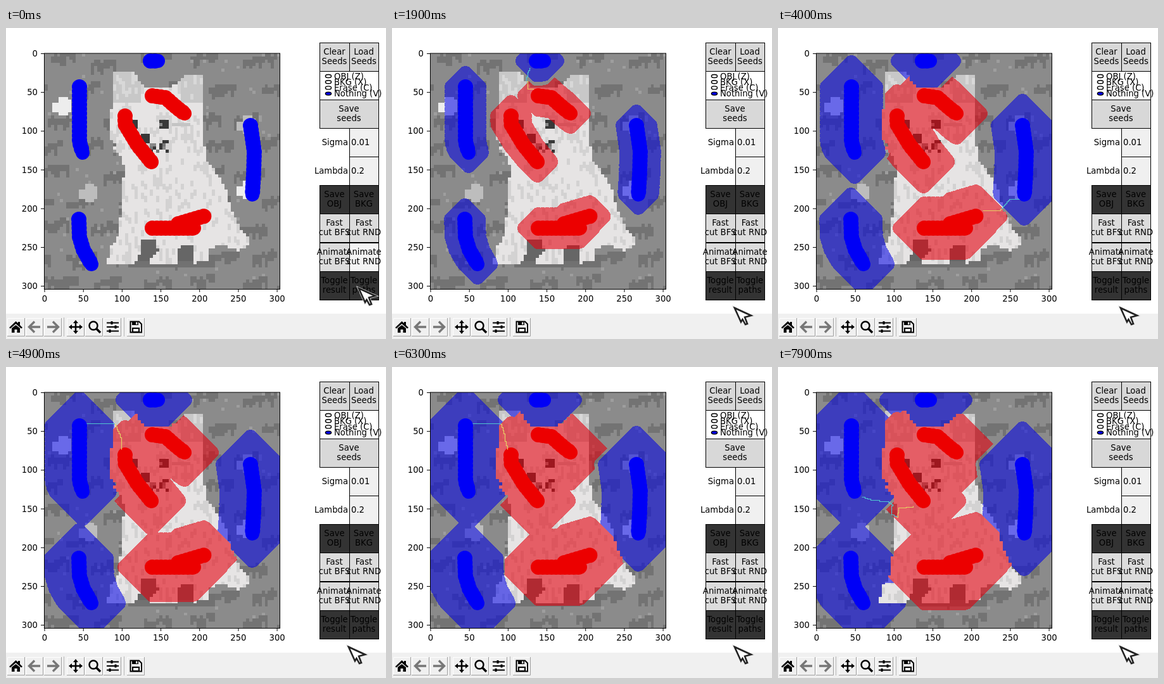
These frames come from a looping animation (600 px wide and 491 px high, 8000 ms). An HTML page with a canvas:

```html
<!DOCTYPE html>
<html lang="en">
<head>
<meta charset="utf-8">
<title>Graph cut segmentation</title>
<style>
  html, body { margin: 0; width: 100%; height: 100%; overflow: hidden; background: #fff; }
  canvas { position: absolute; left: 61px; top: 40px; }
  svg { position: absolute; left: 0; top: 0; }
  text { font: 13.2px "DejaVu Sans", sans-serif; dominant-baseline: central; }
  .mid { text-anchor: middle; }
  .end { text-anchor: end; }
</style>
</head>
<body>
<canvas id="plot" width="372" height="372"></canvas>
<svg id="ui" width="600" height="491" viewBox="0 0 600 491"></svg>
<script>
const LOOP = 8000, STEP = 100, SIZE = 372, GRID = 76, CELL = SIZE / GRID;
const LEFT = 61, TOP = 40;
const ctx = document.getElementById('plot').getContext('2d');
const ui = document.getElementById('ui');

function seeded(n) {
  return () => {
    n = (n + 0x6D2B79F5) | 0;
    let v = Math.imul(n ^ (n >>> 15), n | 1);
    v ^= v + Math.imul(v ^ (v >>> 7), v | 61);
    return ((v ^ (v >>> 14)) >>> 0) / 4294967296;
  };
}

function layer() {
  const c = document.createElement('canvas');
  c.width = c.height = SIZE;
  return c.getContext('2d', { willReadFrequently: true });
}

// ---- pixel picture ----
const dog = new Path2D(`M170 67H198L206 77 212 88 220 93H262L272 85 284 72H312L311 175
  317 208 335 232 347 255 354 283 366 308 376 324 387 334 383 344 366 352 345 344 322 347 322 369
  294 371 294 343 270 347 274 372 232 374 226 364 240 352 238 334 214 336 212 356 203 372
  160 375 163 350 176 330 182 290 184 250 188 218 182 205 172 190 164 166 164 140 171 118Z`);
const base = layer(), inDog = new Uint8Array(GRID * GRID);

function cells(fill, x, y, w = 1, h = 1) {
  base.fillStyle = fill;
  const x0 = Math.round(x * CELL), y0 = Math.round(y * CELL);
  base.fillRect(x0, y0, Math.round((x + w) * CELL) - x0, Math.round((y + h) * CELL) - y0);
}

function paintBackground(rnd) {
  const int = n => Math.floor(rnd() * n);
  cells('#8b8b8b', 0, 0, GRID, GRID);
  // ragged tufts, built column by column
  for (let row = 0; row < 9; row++)
    for (let col = -1; col < 6; col++) {
      const x = col * 15 + (row % 2) * 7 + int(5), y = row * 9 + int(3), w = 8 + int(4);
      for (let k = 0; k < w; k++)
        cells('#737373', x + k, y + int(2) + (k > w / 2 ? -1 : 0), 1, 2 + int(3));
    }
  for (let k = 0; k < 75; k++) cells('#9e9e9e', int(GRID), int(GRID));
  const blob = (fill, x, y) => {
    cells(fill, x, y, 3, 6);
    cells(fill, x - 2, y + 2, 6, 3);
    cells(fill, x + 2, y + 1, 2, 2);
  };
  blob('#ededed', 4.5, 14);
  blob('#bdbdbd', 13, 42);
  blob('#bdbdbd', 64, 20);
  blob('#ededed', 64, 41);
  cells('#717171', 27, 65, 28, 4);
  cells('#666', 30, 60, 7, 7);
  cells('#666', 42, 62, 6, 5);
}

function paintDog(rnd) {
  const specks = Array.from({ length: GRID * GRID }, rnd);
  for (let y = 0; y < GRID; y++)
    for (let x = 0; x < GRID; x++) {
      const px = LEFT + (x + .5) * CELL, py = TOP + (y + .5) * CELL;
      const shift = px < 195 && py > 130 && py < 215 ? ((y >> 1) % 2 ? 2 : -2) : 0;
      if (!base.isPointInPath(dog, px + shift, py)) continue;
      inDog[y * GRID + x] = 1;
      const ear = py < 118 && (px < 212 || px > 274);
      const speck = specks[((y + x % 2) >> 1) * GRID + x] < .24;
      cells(ear ? (speck ? '#d8d8d8' : '#c8c8c8') : speck ? '#d3d2d2' : '#e6e4e4', x, y);
    }
}

function paintFace() {
  const dark = '#383838';
  cells(dark, 28, 21.4, 2, 3);
  cells(dark, 37, 21.4, 3, 3);
  cells('#8a8a8a', 37, 22.4);
  cells('#c4c4c4', 41, 22.4, 6);
  cells(dark, 31, 26, 3, 3);
  for (let k = 0; k < 7; k++) {
    cells(k % 2 ? '#777' : dark, 33 + k, 31 - (k % 3));
    cells(k % 2 ? dark : '#888', 34 + k % 5, 29 + k % 3);
  }
  cells(dark, 38, 28, 2);
}

// ---- seeds and their city-block distances ----
const seeds = {
  blue: 'M116 93V180L121 197M115 302L116 330 122 350 135 373M228 52H240M386 154L392 195 391 230 389 263',
  red: 'M231 107L252 110 270 126 282 135M188 139V152L208 185 230 212M231 316H297M272 309L292 303 313 297'
};

function paintSeeds(kind, colour) {
  const c = layer(), path = new Path2D(seeds[kind]);
  c.translate(-LEFT, -TOP);
  c.lineCap = c.lineJoin = 'round';
  c.strokeStyle = colour;
  c.lineWidth = 22;
  c.stroke(path);
  // overlapping brush dabs give the scalloped rim
  c.lineWidth = 24;
  c.setLineDash([0, 7]);
  c.stroke(path);
  return c;
}

function distances(c) {
  const rgba = c.getImageData(0, 0, SIZE, SIZE).data;
  const d = new Int16Array(SIZE * SIZE);
  for (let i = 0; i < d.length; i++) d[i] = rgba[i * 4 + 3] > 127 ? 0 : 9999;
  for (let y = 0; y < SIZE; y++)
    for (let x = 0; x < SIZE; x++) {
      const i = y * SIZE + x;
      if (x) d[i] = Math.min(d[i], d[i - 1] + 1);
      if (y) d[i] = Math.min(d[i], d[i - SIZE] + 1);
    }
  for (let y = SIZE - 1; y >= 0; y--)
    for (let x = SIZE - 1; x >= 0; x--) {
      const i = y * SIZE + x;
      if (x < SIZE - 1) d[i] = Math.min(d[i], d[i + 1] + 1);
      if (y < SIZE - 1) d[i] = Math.min(d[i], d[i + SIZE] + 1);
    }
  return d;
}

const rndPicture = seeded(17);
paintBackground(rndPicture);
paintDog(rndPicture);
paintFace();
const blueSeeds = paintSeeds('blue', '#0000f6'), redSeeds = paintSeeds('red', '#ec0000');
const toBlue = distances(blueSeeds), toRed = distances(redSeeds);

// ---- growing regions ----
const growth = [[0, 0], [1200, 15.5], [2800, 28.5], [4000, 38.5], [5600, 46.5], [7100, 52], [8000, 57.5]];

function reachAt(t) {
  const k = growth.findIndex(g => g[0] > t);
  const [t0, a] = growth[k - 1], [t1, b] = growth[k];
  return a + (b - a) * (t - t0) / (t1 - t0);
}

const tint = layer(), tintData = tint.createImageData(SIZE, SIZE);
const RED = [228, 0, 14, 150], BLUE = [0, 0, 230, 142], NONE = [0, 0, 0, 0];

function labelAt(x, y, reach, t) {
  const i = y * SIZE + x;
  const dog = inDog[Math.floor((y + .5) / CELL) * GRID + Math.floor((x + .5) / CELL)];
  const red = toRed[i] <= reach, blue = toBlue[i] <= reach;
  if (dog) {
    if (red) return RED;
    const freed = y > 300 && x < 145 && t >= (x < 117 ? 7000 : 7200);
    return blue && !freed ? BLUE : NONE;
  }
  if (blue) return BLUE;
  return red && toBlue[i] > reach + 6 ? RED : NONE;
}

function paintRegions(t) {
  const reach = reachAt(t);
  for (let y = 0; y < SIZE; y++)
    for (let x = 0; x < SIZE; x++)
      tintData.data.set(labelAt(x, y, reach, t), (y * SIZE + x) * 4);
  tint.putImageData(tintData, 0, 0);
  ctx.drawImage(tint.canvas, 0, 0);
}

// ---- augmenting paths: from time, settled time, blue half, red half ----
const routes = [
  [300, 1200, [233, 63, 233, 80], [233, 80, 233, 95]],
  [1900, 2800, [218, 63, 212, 70, 212, 84], [212, 84, 215, 94, 223, 97]],
  [3400, 4000, [381, 270, 365, 272, 353, 286], [353, 286, 351, 288, 323, 288]],
  [4800, 5600, [127, 89, 171, 90], [171, 90, 174, 108, 180, 118, 182, 130]],
  [6400, 7100, [147, 378, 177, 378, 178, 335], [178, 335, 186, 331, 212, 330, 223, 325]],
  [7500, 7900, [132, 205, 146, 210, 174, 213, 181, 219, 179, 233, 187, 237], [187, 237, 190, 222, 213, 219]]
];

function stairs(points, wobble, rnd) {
  let [x, y] = points, d = `M${x} ${y}`;
  for (let k = 2; k < points.length; k += 2) {
    const last = k === points.length - 2;
    const tx = points[k] + (last ? 0 : Math.round((rnd() - .5) * wobble));
    const ty = points[k + 1] + (last ? 0 : Math.round((rnd() - .5) * wobble));
    const n = Math.max(1, Math.round(Math.min(Math.abs(tx - x), Math.abs(ty - y)) / 2));
    for (let s = 1; s <= n; s++)
      d += `H${Math.round(x + (tx - x) * s / n)}V${Math.round(y + (ty - y) * s / n)}`;
    x = tx;
    y = ty;
  }
  return new Path2D(d);
}

function paintPath(t) {
  const route = routes.filter(r => r[0] <= t).pop();
  if (!route) return;
  const [, settled, blueHalf, redHalf] = route;
  const rnd = seeded(t), wobble = t === settled ? 0 : 9;
  ctx.save();
  ctx.translate(.5 - LEFT, .5 - TOP);
  ctx.lineWidth = 1.2;
  ctx.strokeStyle = '#4fc4d0';
  ctx.stroke(stairs(blueHalf, wobble, rnd));
  ctx.strokeStyle = settled === 1200 ? '#8fd45c' : '#e6cf63';
  ctx.stroke(stairs(redHalf, wobble, rnd));
  ctx.restore();
}

// ---- window ----
const rect = (x, y, w, h, fill, stroke = '#000') =>
  `<rect x="${x + .5}" y="${y + .5}" width="${w}" height="${h}" fill="${fill}" stroke="${stroke}"/>`;
const label = (x, y, s, cls = '') => `<text x="${x}" y="${y}" class="${cls}">${s}</text>`;
const line = (d, stroke = '#000', w = 1) => `<path d="${d}" fill="none" stroke="${stroke}" stroke-width="${w}"/>`;

function button(x, y, w, fill, a, b, id = '') {
  const box = rect(x, y, w, 45, fill).replace('<rect', `<rect id="${id}"`);
  return box + label(x + w / 2, y + 14, a, 'mid') + label(x + w / 2, y + 29.5, b, 'mid');
}

function axes() {
  let s = rect(60, 39.5, SIZE, SIZE + .5, 'none');
  for (let v = 0; v <= 300; v += 50) {
    const p = v * SIZE / 304;
    s += line(`M${61 + p} 412v5M60 ${40.5 + p}h-5`) +
      label(61 + p, 427, v, 'mid') + label(50, 40.5 + p, v, 'end');
  }
  return s;
}

function panel() {
  const a = 495, b = 542, w = 47, w2 = 46, dark = '#333';
  let s = button(a, 23, w, '#d8d8d8', 'Clear', 'Seeds') + button(b, 23, w2, '#d8d8d8', 'Load', 'Seeds');
  s += rect(a, 68, 93, 45, '#fff');
  ['OBJ (Z)', 'BKG (X)', 'Erase (C)', 'Nothing (V)'].forEach((name, k) => {
    const y = 76 + k * 9.2;
    s += `<ellipse cx="509" cy="${y}" rx="4.600" ry="2.500" fill="${k === 3 ? '#00f' : '#fff'}"` +
      ' stroke="#000" stroke-width="1.400"/>' + label(518, y, name);
  });
  s += button(a, 113, 93, '#d8d8d8', 'Save', 'seeds');
  s += rect(b, 158, w2, 45, '#f0f0f0') + label(540, 180, 'Sigma', 'end') + label(545, 180, '0.01');
  s += rect(b, 203, w2, 45, '#f0f0f0') + label(540, 225.5, 'Lambda', 'end') + label(545, 225.5, '0.2');
  s += button(a, 248, w, dark, 'Save', 'OBJ') + button(b, 248, w2, dark, 'Save', 'BKG');
  s += button(a, 293, w, '#dcdcdc', 'Fast', 'cut BFS') + button(b, 293, w2, '#dcdcdc', 'Fast', 'cut RND');
  s += button(a, 339, w, '#dcdcdc', 'Animate', 'cut BFS') +
    button(b, 339, w2, '#dcdcdc', 'Animate', 'cut RND', 'animate');
  s += button(a, 384, w, dark, 'Toggle', 'result') + button(b, 384, w2, dark, 'Toggle', 'paths');
  return s;
}

function toolbar() {
  let s = '<rect y="451" width="600" height="40" fill="#f0f0f0"/>';
  for (const x of [2, 31, 60, 96, 125, 154, 191])
    s += line(`M${x + .5} 486V458.5H${x + 27}`, '#fff') + line(`M${x} 486.5H${x + 27.5}V458`, '#a0a0a0');
  s += line('M91.5 457V487M186.5 457V487', '#b8b8b8');
  s += '<path d="M5 473L15.500 463 19 466V464H22V469L26 473 24 474.500 15.500 467 7 474.500Z' +
    'M9 474L15.500 469 22 474V481H17.500V476H13.500V481H9Z"/>';
  s += line('M54 472H38M45 463.500L36.500 472 45 480.500M65 472H81M74 463.500L82.500 472 74 480.500', '#777', 3.4);
  s += line('M110 464V480M102 472H118', '#000', 2.5) +
    '<path d="M110 461L114 466H106ZM110 483L106 478H114ZM99 472L104 468V476ZM121 472L116 468V476Z"/>';
  s += '<circle cx="138" cy="470" r="6.500" fill="none" stroke="#000" stroke-width="2.500"/>' +
    line('M142.500 474.500L149 481', '#000', 3.5);
  s += line('M159 465.500H178M159 472H178M159 478.500H178', '#000', 1.8) +
    line('M167 463V468M173 469.500V474.500M164 476V481', '#000', 3);
  s += line('M196.500 463.500H210L214 467.500V480.500H196.500Z', '#000', 2) +
    '<path d="M199 464H209V469H199ZM199 473H211V480H199Z"/><path d="M201 475H209V479H201Z" fill="#f0f0f0"/>' +
    '<path d="M205 464.500H207.500V468H205Z" fill="#f0f0f0"/>';
  return s;
}

const arrow = 'M0 0L26 12 16 14.500 20 25 17 26 12.500 18 10 22Z';
ui.innerHTML = axes() + panel() + toolbar() +
  `<g id="cursor"><path d="${arrow}" fill="none" stroke="#ddd" stroke-width="4"/>` +
  `<path d="${arrow}" fill="#fff" stroke="#222" stroke-width="2.500"/></g>`;
const cursor = document.getElementById('cursor'), animate = document.getElementById('animate');

// ---- playback ----
let shown = -1;

function render(t) {
  ctx.drawImage(base.canvas, 0, 0);
  if (t > 0) paintRegions(t);
  ctx.drawImage(blueSeeds.canvas, 0, 0);
  ctx.drawImage(redSeeds.canvas, 0, 0);
  paintPath(t);
  const p = Math.min(1, t / 900), e = p * p * (3 - 2 * p);
  cursor.setAttribute('transform', `translate(${557 - 16 * e} ${411 + 31 * e})`);
  animate.setAttribute('fill', t < 200 ? '#f4f4f4' : '#dcdcdc');
}

function tick() {
  const t = Math.floor(performance.now() % LOOP / STEP) * STEP;
  if (t !== shown) render(shown = t);
  requestAnimationFrame(tick);
}
tick();
</script>
</body>
</html>
```
